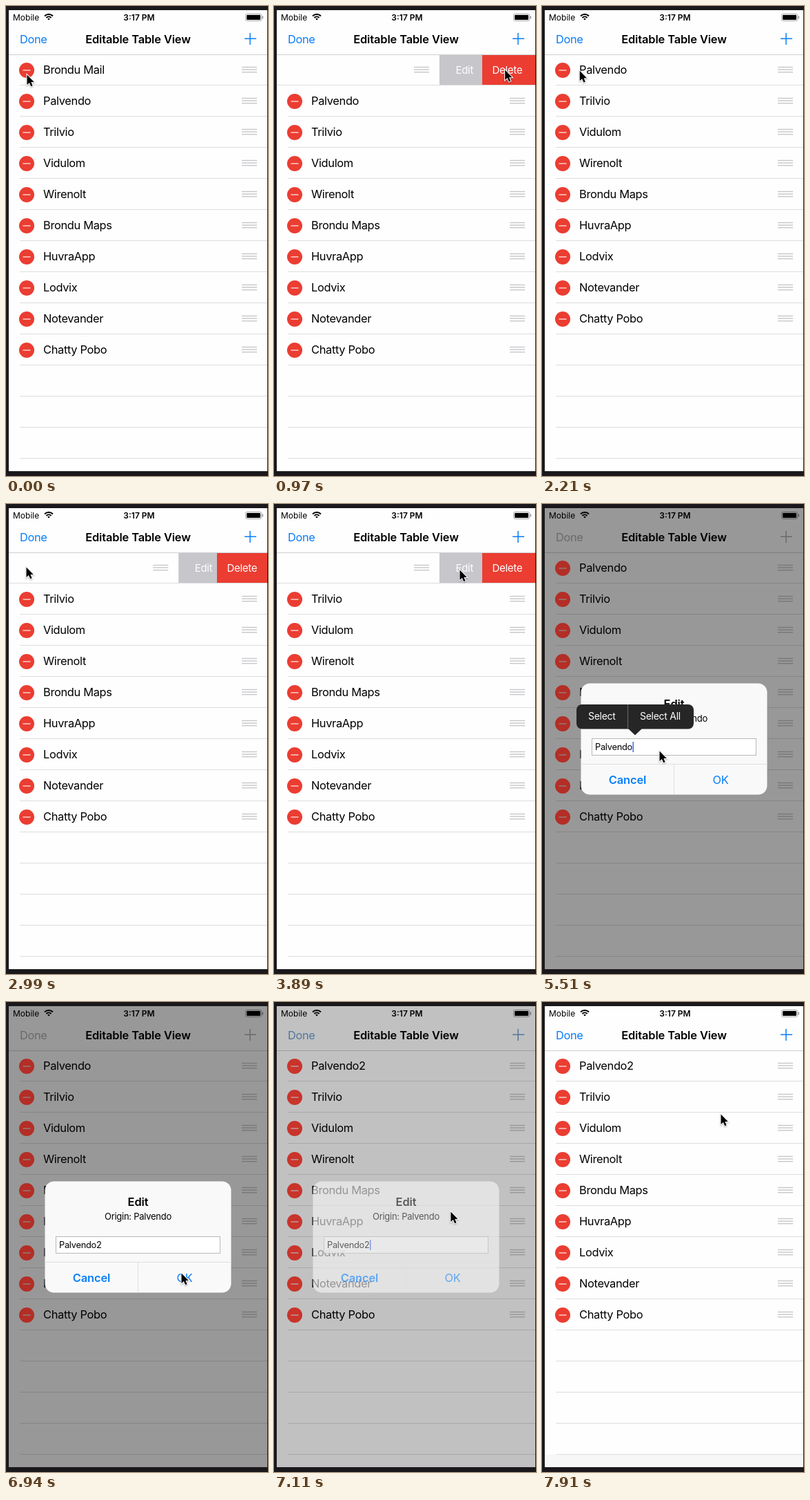
An HTML page with a canvas for the animation above (8 s loop, 380 by 680 pixels).

```html
<!DOCTYPE html>
<html lang="en">
<head>
<meta charset="utf-8">
<title>Editable table</title>
<style>
  html, body { margin: 0; width: 100%; height: 100%; overflow: hidden; background: #1a181a; }
  canvas { display: block; width: 380px; height: 680px; }
</style>
</head>
<body>
<canvas id="stage" width="380" height="680"></canvas>
<script>
const ctx = document.getElementById('stage').getContext('2d');
const LOOP = 8000, REFRESH = 88, ROW = 45;
const ACTIONS = 139, DELETE = 77;
const NAMES = ['Brondu Mail', 'Palvendo', 'Trilvio', 'Vidulom', 'Wirenolt', 'Brondu Maps',
  'HuvraApp', 'Lodvix', 'Notevander', 'Chatty Pobo'];
const EDITED = NAMES[1];

const WHITE = [254, 254, 254], BLUE = [8, 126, 251], RED = [235, 61, 50];
const LINE = [221, 221, 222], GRIP = [199, 199, 203], MUTED = [176, 176, 176];

// What the user does with the pointer; sag bends a move downwards.
const START = { x: 30, y: 99 };
const MOVES = [
  { from: 400, to: 1150, x: 339, y: 92 },             // to Delete
  { from: 1690, to: 2590, x: 29, y: 91, sag: 34 },    // to the next row's minus
  { from: 2950, to: 3540, x: 269, y: 95, sag: 16 },   // to Edit
  { from: 4080, to: 4980, x: 170, y: 357 },           // to the text field
  { from: 5560, to: 6200, x: 259, y: 358 },
  { from: 6290, to: 6600, x: 254, y: 392 },           // to OK
  { from: 6900, to: 7830, x: 259, y: 162 },
];

const ramp = (t, start, end) => Math.max(0, Math.min(1, (t - start) / (end - start)));
const easeOut = x => 1 - (1 - x) ** 3;
const mix = (a, b, k) => a + (b - a) * k;
const blend = (a, b, k) => a.map((v, i) => mix(v, b[i], k));
const css = c => `rgb(${c.map(Math.round)})`;

let dim = 0;
const shade = c => css(c.map(v => v * (1 - dim)));
const shadeRed = () => css(RED.map(v => v * (1 - dim * 0.6)));

function pointerAt(t) {
  let { x, y } = START;
  for (const move of MOVES) {
    const k = easeOut(ramp(t, move.from, move.to));
    x = mix(x, move.x, k);
    y = mix(y, move.y, k) + (move.sag || 0) * Math.sin(Math.PI * k) ** 2;
  }
  return [x, y];
}

function rect(x, y, w, h, color) {
  ctx.fillStyle = color;
  ctx.fillRect(x, y, w, h);
}

function roundRect(x, y, w, h, r, color) {
  ctx.fillStyle = color;
  ctx.beginPath();
  ctx.roundRect(x, y, w, h, r);
  ctx.fill();
}

function text(str, x, y, size, color, { weight = 400, align = 'left', spacing = -0.02 } = {}) {
  ctx.font = `${weight} ${size}px Inter, "Noto Sans", sans-serif`;
  ctx.letterSpacing = `${spacing * size}px`;
  ctx.textAlign = align;
  ctx.fillStyle = color;
  ctx.fillText(str, x, y);
}

function statusBar() {
  text('Mobile', 10, 21, 12, '#000', { spacing: 0 });
  text('3:17 PM', 193, 21, 12, '#000', { weight: 600, align: 'center', spacing: 0 });
  ctx.strokeStyle = '#000';
  ctx.lineWidth = 2;
  for (const radius of [1.5, 5, 8.5]) {
    ctx.beginPath();
    ctx.arc(62, 20.5, radius, -Math.PI * 0.75, -Math.PI * 0.25);
    ctx.stroke();
  }
  ctx.strokeStyle = shade([165, 165, 165]);
  ctx.lineWidth = 1;
  ctx.beginPath();
  ctx.roundRect(347.5, 11.5, 23, 10, 2);
  ctx.stroke();
  roundRect(349, 13, 20, 7, 1, '#000');
  rect(371.5, 14.5, 1.5, 4, shade([150, 150, 150]));
}

function navBar(tint) {
  text('Done', 20, 54, 16.4, tint);
  text('Editable Table View', 191.5, 54, 16.4, '#000', { weight: 600, align: 'center', spacing: -0.007 });
  rect(346, 46.5, 17, 1.5, tint);
  rect(353.25, 39, 1.5, 17, tint);
  rect(4, 70, 375, 1, shade([208, 208, 210]));
}

function row(name, index, shift) {
  const y = 93 + index * ROW;
  ctx.fillStyle = shadeRed();
  ctx.beginPath();
  ctx.arc(30 + shift, y, 11, 0, Math.PI * 2);
  ctx.fill();
  rect(24.5 + shift, y - 0.75, 11, 1.5, shade([250, 205, 202]));
  text(name, 54 + shift, y + 5, 16.4, '#000');
  for (let i = -1; i <= 1; i++) rect(342 + shift, y - 1.6 + i * 3.6, 22, 1.4, shade(GRIP));
}

function rowActions(open) {
  const left = 379 - ACTIONS * open, deleteLeft = 379 - DELETE * open ** 0.7;
  rect(left, 71, 379 - left, 43, shade([198, 198, 203]));
  text('Edit', left + 23.5, 98, 15, shade(WHITE));
  rect(deleteLeft, 71, 379 - deleteLeft, 43, shadeRed());
  text('Delete', deleteLeft + 14.5, 98, 15, shade(WHITE));
}

function table(t) {
  const removed = t >= 1400;
  const open = removed
    ? easeOut(ramp(t, 2660, 3080)) * (1 - ramp(t, 3900, 4100))
    : easeOut(ramp(t, 200, 620));
  for (let i = 0; i < 13; i++) {
    const shift = i ? 0 : ACTIONS * open;
    rect(20 - shift, 114 + i * ROW, 375 + shift, 1, shade(LINE));
  }
  NAMES.slice(removed ? 1 : 0).forEach((name, i) => {
    const label = name === EDITED && t >= 7000 ? name + '2' : name;
    row(label, i, i ? 0 : -ACTIONS * open);
  });
  if (open > 0) rowActions(open);
  if (t >= 7600) rect(4, 655, 375, 18, '#f7f7f7');
}

function alertBox(t, alpha, scale) {
  const bold = { weight: 600, align: 'center', spacing: -0.007 }, centered = { align: 'center' };
  const blue = css(BLUE);
  const typed = EDITED + (t >= 5760 ? '2' : '');
  ctx.save();
  ctx.globalAlpha = alpha;
  ctx.translate(191.5, 340);
  ctx.scale(scale, scale);
  ctx.translate(-191.5, -340);
  roundRect(56.5, 259.5, 270, 161, 13, '#f9f9f9');
  text('Edit', 191.5, 295, 16.4, '#000', bold);
  text('Origin: ' + EDITED, 191.5, 315, 13, '#000', centered);
  rect(72, 339, 239, 25, '#b8b8b8');
  rect(73, 340, 237, 23, '#fff');
  text(typed, 77, 356, 12.8, '#000');
  if (t % 1000 < 560) {
    rect(77.5 + ctx.measureText(typed).width, 344, 1.5, 15, '#4568ea');
  }
  rect(56.5, 376, 270, 1, '#dededf');
  rect(191, 377, 1, 43.5, '#dededf');
  text('Cancel', 124, 405, 16.4, blue, bold);
  text('OK', 259, 405, 16.4, blue, centered);
  ctx.restore();
}

function selectMenu(alpha) {
  ctx.save();
  ctx.globalAlpha = alpha;
  roundRect(50, 290, 170, 35.5, 8, '#262627');
  ctx.beginPath();
  ctx.moveTo(125, 325);
  ctx.lineTo(135, 334.5);
  ctx.lineTo(145, 325);
  ctx.fill();
  rect(124, 290, 1, 35.5, '#6a6a6b');
  text('Select', 67, 312, 14, '#fff');
  text('Select All', 142, 312, 14, '#fff');
  ctx.restore();
}

function pointer(x, y) {
  ctx.save();
  ctx.translate(x + 0.5, y + 0.5);
  const arrow = new Path2D('M0 0V14.5L3.4 11.5L5.7 16.8L8.1 15.8L5.9 10.6H10.3Z');
  ctx.shadowColor = 'rgba(0,0,0,.3)';
  ctx.shadowBlur = 2;
  ctx.shadowOffsetY = 1;
  ctx.strokeStyle = '#fff';
  ctx.lineWidth = 2;
  ctx.stroke(arrow);
  ctx.shadowColor = 'transparent';
  ctx.fillStyle = '#000';
  ctx.fill(arrow);
  ctx.restore();
}

function draw(t) {
  const shown = easeOut(ramp(t, 3900, 4147));
  const alertAlpha = shown * (1 - ramp(t, 6900, 7250));
  const menuAlpha = ramp(t, 5200, 5440) * (1 - ramp(t, 5560, 5760));
  dim = 0.4 * alertAlpha;

  rect(0, 0, 380, 680, '#1a181a');
  ctx.save();
  ctx.beginPath();
  ctx.rect(4, 6, 375, 667);
  ctx.clip();
  rect(4, 6, 375, 667, shade(WHITE));
  statusBar();
  navBar(shade(blend(BLUE, MUTED, alertAlpha)));
  table(t);
  if (alertAlpha > 0) alertBox(t, alertAlpha, mix(1.17, 1, shown));
  if (menuAlpha > 0) selectMenu(menuAlpha);
  ctx.restore();
  pointer(...pointerAt(t));
}

// The screen refreshes in coarse steps.
function tick() {
  const t = performance.now() % LOOP;
  draw(t - t % REFRESH);
  requestAnimationFrame(tick);
}
tick();
</script>
</body>
</html>
```
